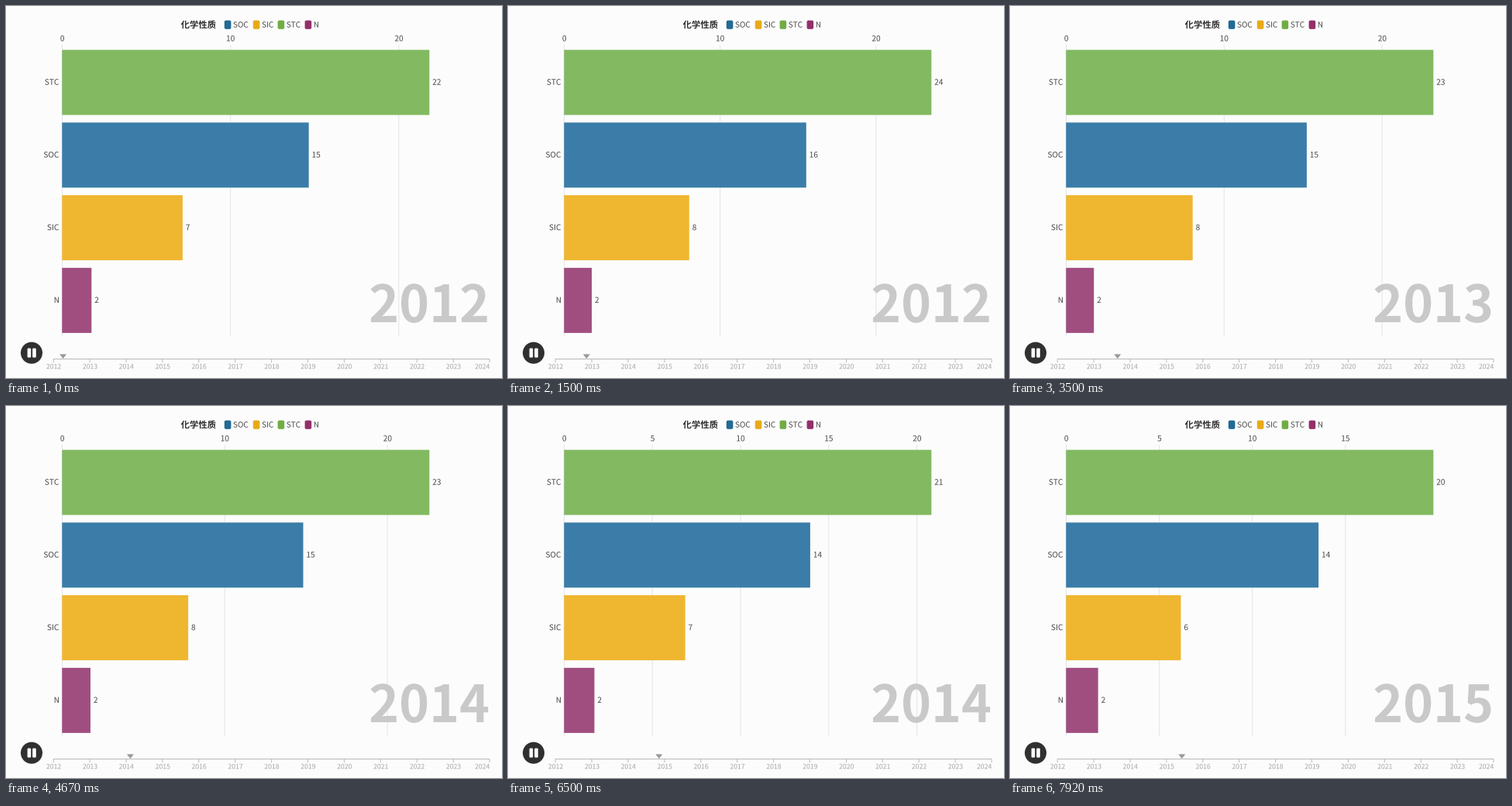
These frames come from a looping animation (640x480 px, 8 s). A matplotlib script:

```python
import numpy as np
import matplotlib.pyplot as plt
from matplotlib.animation import FuncAnimation
from matplotlib.patches import Circle, FancyBboxPatch, PathPatch, Polygon, Rectangle
from matplotlib.path import Path
from matplotlib.textpath import TextPath

W, H = 640, 480
FRAMES, STEP_MS = 200, 40
FONT = "Noto Sans CJK JP"

BG = "#fcfcfc"
INK = "#484848"
DARK = "#303030"
GRID = "#e4e4ec"
AXIS = "#b8b8b8"
PALE = "#c9c9c9"

# Bar area
X0, FULL = 72.3, 474
TOP, PITCH, BAR_H = 56.6, 93.75, 84

# Timeline
LINE_X, YEAR_W, LINE_Y = 61.2, 46.9, 455.5
START, MS_PER_YEAR = 0.265, 2507

# Yearly values from 2012 on
KNOTS = np.arange(5)
STC = [21.05, 23.99, 22.87, 20.47, 18.73]
SOC = [14.27, 15.75, 14.97, 13.78, 13.27]
NIT = [1.74, 1.785, 1.752, 1.717, 1.73]

BARS = [("STC", "#82b961"), ("SOC", "#3b7da8"), ("SIC", "#efb630"), ("N", "#a04e80")]
LEGEND = [("SOC", 281.8, "#226a94"), ("SIC", 318.8, "#e8aa18"),
          ("STC", 350.6, "#70ad44"), ("N", 385.6, "#942e6a")]

fig = plt.figure(figsize=(W / 100, H / 100), dpi=100, facecolor=BG)
ax = fig.add_axes([0, 0, 1, 1])
ax.set_xlim(0, W)
ax.set_ylim(H, 0)
ax.axis("off")


def put(patch, z=2):
    patch.set_zorder(z)
    patch.set_snap(False)
    return ax.add_patch(patch)


def rect(x, y, w, h, color, z=2):
    return put(Rectangle((x, y), w, h, fc=color, lw=0), z)


def rounded(x, y, w, h, r, color, z=2):
    style = f"round,pad=0,rounding_size={r}"
    return put(FancyBboxPatch((x, y), w, h, boxstyle=style, fc=color, lw=0), z)


def text(x, y, s, size=10.1, color=INK, align="origin", weight="normal", z=4):
    """Place text on baseline y, aligned at x by its origin or its ink."""
    glyphs = TextPath((0, 0), s, size=size, prop={"family": FONT, "weight": weight})
    box = glyphs.get_extents()
    shift = {"origin": 0, "right": box.x1, "center": (box.x0 + box.x1) / 2}[align]
    verts = glyphs.vertices * [1, -1] + [x - shift, y]
    return put(PathPatch(Path(verts, glyphs.codes), fc=color, lw=0), z)


def bar_baseline(i):
    return TOP + i * PITCH + BAR_H / 2 + 3.1


def draw_static():
    text(225.6, 28.2, "化学性质", 11.35, DARK, weight="bold")
    for name, x, color in LEGEND:
        rounded(x, 18.6, 8.6, 11.2, 2, color)
        text(x + 11.2, 27.6, name, 10)

    for i, (name, _) in enumerate(BARS):
        text(68, bar_baseline(i), name, align="right")

    put(Circle((33, 447.6), 14, fc=DARK, lw=0))
    for x in (27.6, 34.2):
        rounded(x, 441.6, 4.6, 12, 1.2, "white", 3)

    rect(LINE_X, LINE_Y - 0.5, 12 * YEAR_W, 1, AXIS)
    for i in range(13):
        x = LINE_X + i * YEAR_W
        rect(x - 0.5, LINE_Y, 1, 4.5, AXIS)
        align, tx = ("right", 624) if i == 12 else ("center", x + 0.3)
        text(tx, 468.2, str(2012 + i), 8.7, "#a6a6a6", align)


def tick_step(top):
    """Round step (1, 2, 5 or 10) giving about three ticks."""
    raw = top / 3
    base = 10 ** np.floor(np.log10(raw))
    ratio = raw / base
    for limit, mult in ((50, 10), (10, 5), (2, 2)):
        if ratio >= limit ** 0.5:
            return int(base * mult)
    return int(base)


moving = []


def draw(frame):
    while moving:
        moving.pop().remove()

    pos = START + frame * STEP_MS / MS_PER_YEAR
    stc, soc, nit = (np.interp(pos, KNOTS, v) for v in (STC, SOC, NIT))
    unit = FULL / stc

    for v in range(0, int(stc) + 1, tick_step(stc)):
        x = X0 + v * unit
        moving.append(rect(x - 0.3, 50, 1, 376.5, GRID, 1))
        moving.append(text(x + 0.4, 45.4, str(v), align="center"))

    for i, value in enumerate((stc, soc, stc - soc, nit)):
        right = X0 + value * unit
        moving.append(rect(X0, TOP + i * PITCH, right - X0, BAR_H, BARS[i][1]))
        moving.append(text(right + 3.9, bar_baseline(i), str(round(value))))

    moving.append(text(468.2, 408, str(2012 + int(pos)), 66, PALE,
                       weight="bold", z=1.5))
    x = LINE_X + pos * YEAR_W
    moving.append(put(Polygon([(x - 4.5, 449.3), (x + 4.5, 449.3), (x, 455)],
                              fc="#999999", lw=0), 3))
    return moving


draw_static()
anim = FuncAnimation(fig, draw, frames=FRAMES, interval=STEP_MS,
                     init_func=lambda: draw(0), repeat=True, repeat_delay=0)
plt.show()
```
